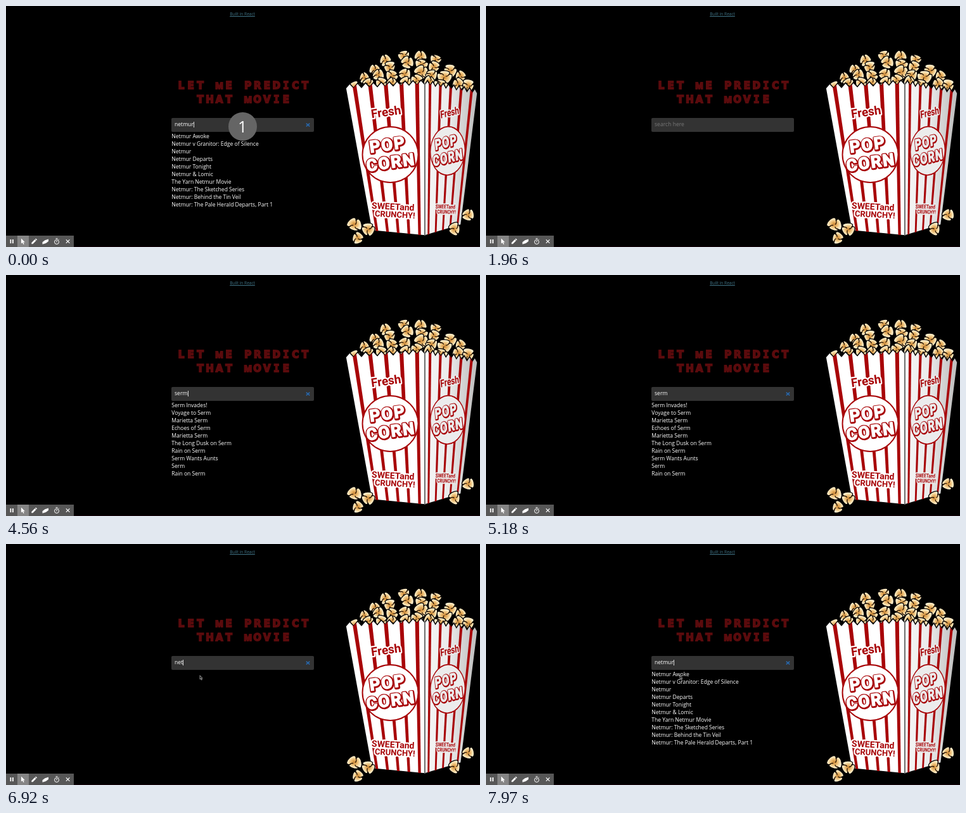
Animation of 748x381 px, one loop 8 s. Source, as an HTML page:

```html
<!DOCTYPE html>
<html lang="en">
<head>
<meta charset="utf-8">
<title>Movie predictor</title>
<style>
  html, body { margin: 0; width: 748px; height: 381px; overflow: hidden; background: #000; }
  body { position: relative; font-family: "Open Sans", "Noto Sans", sans-serif; color: #fff; }
  body > * { position: absolute; }
  #art { left: 0; top: 0; }
  #link { left: 273px; width: 200px; top: 7px; text-align: center; font-size: 6.55px; line-height: 11px;
    color: #3f7284; text-decoration: underline; }
  #field { left: 261px; top: 177px; width: 224.5px; height: 22px; border-radius: 2px; background: #333;
    font-size: 8.6px; line-height: 21.5px; white-space: pre; }
  #query { position: absolute; left: 5px; }
  #query.empty { color: #777; }
  #caret { display: inline-block; width: .7px; height: 9px; margin-left: .2px; background: #ddd; vertical-align: -1.5px; }
  #clear { position: absolute; left: 212px; top: 8px; }
  #list { left: 261.3px; top: 200px; font-size: 8.55px; line-height: 12px; white-space: pre; }
  #ring { left: 351px; top: 168px; width: 44.5px; height: 44.5px; border-radius: 50%; background: #656565;
    font: 25px/45px "Open Sans", sans-serif; text-align: center; }
  #mouse { left: 305px; top: 207px; }
</style>
</head>
<body>
<svg id="art" width="748" height="381" viewBox="0 0 748 381">
  <defs>
    <radialGradient id="corn">
      <stop offset="0" stop-color="#c98433"/><stop offset=".4" stop-color="#eab86c"/>
      <stop offset=".75" stop-color="#fbe3b4"/><stop offset="1" stop-color="#fff3d6"/>
    </radialGradient>
    <linearGradient id="shade">
      <stop offset="0" stop-color="#f6f6f6"/><stop offset=".45" stop-color="#ebebeb"/><stop offset="1" stop-color="#bcbcbc"/>
    </linearGradient>
  </defs>
  <g id="title" fill="#5b0b0d" stroke="#5b0b0d" stroke-width="1.8" text-anchor="middle"
     font-family="DejaVu Sans, sans-serif" font-weight="700" font-size="15"></g>
  <g id="box"></g>
  <path d="M107 380.5H748" stroke="#16040c"/>
  <g id="tools">
    <path d="M0 363H107V381H0z" fill="#575757"/>
    <path d="M18 363H36V381H18z" fill="#858585"/>
    <g fill="#fff">
      <path d="M6.5 369h1.8v6.2h-1.8zM10 369h1.8v6.2H10z"/>
      <path d="M24 367.5v8l2-1.6 1.4 3 1.3-.6-1.4-2.9h2.6z"/>
      <path d="M40.3 376.2v-2l5.2-5.2 2 2-5.2 5.2zM46.1 368.4l1-1 2 2-1 1z"/>
      <path d="M57.5 373.2l4-3 5.5-1.8v3.5l-4 3-5.5 1.8z"/>
    </g>
    <g fill="none" stroke="#fff">
      <circle cx="80" cy="373" r="3.5"/><path d="M78.5 367.6h3M80 371v2.5M82.8 369.6l.9-.9"/>
      <path d="M94.8 369.3l5.6 5.6M100.4 369.3l-5.6 5.6" stroke-width="1.2"/>
    </g>
  </g>
</svg>
<div id="link">Built in React</div>
<div id="field"><span id="query"><span id="typed"></span><i id="caret"></i></span>
  <svg id="clear" width="7" height="6"><path d="M.8 .7L6.2 5.3M6.2 .7L.8 5.3" stroke="#2868ad" stroke-width="1.6"/></svg>
</div>
<div id="list"></div>
<div id="ring">1</div>
<svg id="mouse" width="6" height="9"><path d="M1 .8V6.8L2.4 5.6 3.4 8 4.4 7.5 3.4 5.2H5z" fill="#111" stroke="#ccc" stroke-width=".7"/></svg>

<script>
const $ = id => document.getElementById(id);
const RED = '#a80508';

// Heading: one wide letter per 15px cell
function heading(line, x, y) {
  return [...line].map((c, i) => {
    const face = c === 'M' ? 'Liberation Sans, sans-serif' : c === 'I' ? 'DejaVu Sans Mono, monospace' : '';
    return `<tspan x="${x + 7.5 + i * 15.03}" y="${y}"${face && ` font-family="${face}"`}>${c}</tspan>`;
  }).join('');
}
$('title').innerHTML = `<text>${heading('LET ME PREDICT', 269, 131.3)}</text><text>${heading('THAT MOVIE', 299, 153.3)}</text>`;

let seed = 11;
const rnd = () => (seed = seed * 16807 % 2147483647) / 2147483647;

// A three-lobed puff with dark creases
function kernel(x, y, r) {
  const at = (a, d) => `${(x + Math.cos(a) * d * r).toFixed(1)} ${(y + Math.sin(a) * d * r).toFixed(1)}`;
  const turn = rnd() * 6.28, arc = 6.283 / 3;
  let edge = 'M' + at(turn, .6), creases = '';
  for (let i = 0; i < 3; i++) {
    const a = turn + i * arc, reach = 1.1 + rnd() * .7;
    edge += `C${at(a + .15, reach)} ${at(a + arc - .15, reach)} ${at(a + arc, .6)}`;
    creases += `M${at(a, .65)}Q${at(a + .5, .4)} ${at(a + .3, .15)}`;
  }
  return `<path d="${edge}z" fill="url(#corn)" stroke="#000" stroke-width="1.3"/>
    <path d="${creases}" fill="none" stroke="#2a1604" stroke-width="1.3"/>`;
}

function heap() {
  let s = '';
  for (let k = 0; k < 4; k++) {
    const n = 4 + 2 * k, span = [100, 142, 174, 196][k];
    for (let i = 0; i < n; i++) {
      const u = (i + .5 + (rnd() - .5) * .4) / n - .5;
      s += kernel(641 + u * span, 77 + 14 * k + 50 * u * u + (rnd() - .5) * 7, 10.5 + rnd() * 3);
    }
  }
  return s;
}

// One side of the carton: zigzag top edge a-b, bottom edge c-d, n stripes
function side(id, a, b, c, d, n, fill, wide) {
  const mix = (p, q, t) => [p[0] + (q[0] - p[0]) * t, p[1] + (q[1] - p[1]) * t];
  const rim = [], ends = n * 4;
  for (let i = 0; i <= ends; i++) {
    const p = mix(a, b, i / ends);
    rim.push([p[0], p[1] + (i % 2 ? -3 : 4)]);
  }
  const pts = [...rim, d, c].join(' ');
  let bars = '';
  for (let i = 0; i < n; i++) {
    const t = (i + .5) / n, w = wide / n / 2;
    const up = s => { const p = mix(a, b, s); return [p[0], p[1] - 8]; };
    bars += `<polygon points="${[up(t - w), up(t + w), mix(c, d, t + w), mix(c, d, t - w)].join(' ')}"/>`;
  }
  return `<clipPath id="${id}"><polygon points="${pts}"/></clipPath>
    <polygon points="${pts}" fill="${fill}" stroke="#000" stroke-width="1.5"/>
    <g clip-path="url(#${id})" fill="${RED}">${bars}</g>`;
}

function words(s, x, y, size, turn, style) {
  return `<text transform="translate(${x} ${y}) rotate(${turn})" font-size="${size}" ${style}>${s}</text>`;
}

function label(place, paper, fresh, sweet, size) {
  const halo = `fill="${RED}" stroke="${paper}" stroke-width="4.5"`;
  const bubble = (s, x, y) =>
    words(s, x + .6, y + .8, 26, -8, `letter-spacing="2" fill="${RED}" stroke="${RED}" stroke-width="5.4"`) +
    words(s, x, y, 26, -8, `letter-spacing="2" fill="${paper}" stroke="${paper}" stroke-width="1.6"`);
  return `<g transform="${place}" text-anchor="middle" font-family="Roboto, sans-serif" font-weight="700"
      stroke-linejoin="round" paint-order="stroke">
    <circle r="43" fill="${paper}" stroke="${RED}" stroke-width="4"/>
    ${bubble('POP', -3, -7)}${bubble('CORN', 2, 21)}
    ${words('Fresh', ...fresh, 19, -8, halo)}
    ${words('SWEETand', sweet[0], sweet[1], size, 3, halo)}
    ${words('CRUNCHY!', sweet[0] + 3, sweet[1] + size * .87, size * .93, 3, halo)}
  </g>`;
}

$('box').innerHTML = heap() +
  side('front', [536, 126], [661, 120], [577, 355], [661, 363], 5, '#fff', .25) +
  side('right', [661, 120], [744, 134], [661, 363], [718, 346], 5, 'url(#shade)', .25) +
  '<path d="M661 120V363" stroke="#bbb"/>' +
  label('translate(606.5 235)', '#fff', [-6, -61], [4, 87], 14) +
  label('translate(697 229) skewY(-3) scale(.62 .87)', '#ececec', [6, -63], [-6, 105], 10.5) +
  kernel(550, 347, 13) + kernel(571, 353, 12) + kernel(554, 367, 11) +
  kernel(729, 330, 12) + kernel(709, 353, 12);

const lists = {
  hero: `Netmur Awoke
Netmur v Granitor: Edge of Silence
Netmur
Netmur Departs
Netmur Tonight
Netmur & Lomic
The Yarn Netmur Movie
Netmur: The Sketched Series
Netmur: Behind the Tin Veil
Netmur: The Pale Herald Departs, Part 1`,
  planet: `Serm Invades!
Voyage to Serm
Marietta Serm
Echoes of Serm
Marietta Serm
The Long Dusk on Serm
Rain on Serm
Serm Wants Aunts
Serm
Rain on Serm`,
  none: ''
};

// time, typed text, list, caret, countdown opacity, pointer
const steps = [
  [0, 'netmur', 'hero', 1, 1],
  [100, 'netmur', 'hero', 1, .7],
  [260, 'netmur', 'hero', 1, .35],
  [420, 'netmur', 'hero', 1],
  [570, 'netmur', 'hero', 0],
  [970, 'netmu', 'hero', 1],
  [1470, 'netm', 'hero', 1],
  [1830, 'net', 'hero', 1],
  [1960, '', 'none', 0],
  [2460, 's', 'none', 1],
  [2620, 'se', 'none', 1],
  [3030, 'ser', 'none', 1],
  [3230, 'serm', 'none', 1],
  [3610, 'serm', 'planet', 1],
  [3840, 'serm', 'planet', 0],
  [4560, 'serm', 'planet', 1],
  [5180, 'serm', 'planet', 0],
  [5410, 'serm', 'planet', 1],
  [5710, '', 'planet', 0],
  [6240, 'n', 'none', 1],
  [6450, 'ne', 'none', 1, 0, 1],
  [6770, 'net', 'none', 1, 0, 1],
  [7300, 'net', 'none', 0, 0, 1],
  [7610, 'netm', 'none', 1, 0, 1],
  [7790, 'netmu', 'none', 1, 0, 1],
  [7970, 'netmur', 'hero', 1, 0, 1]
];

const show = (id, on) => { $(id).style.visibility = on ? 'visible' : 'hidden'; };
let current;

function draw(now) {
  const t = now % 8000;
  const step = steps.findLast(s => s[0] <= t);
  if (step !== current) {
    current = step;
    const [, text, list, caret, ring = 0, mouse = 0] = step;
    $('typed').textContent = text || 'search here';
    $('query').className = text ? '' : 'empty';
    $('list').textContent = lists[list];
    $('ring').style.opacity = ring;
    show('caret', caret);
    show('clear', text);
    show('mouse', mouse);
  }
}

const start = performance.now();
function tick() {
  draw(performance.now() - start);
  requestAnimationFrame(tick);
}
tick();
</script>
</body>
</html>
```
